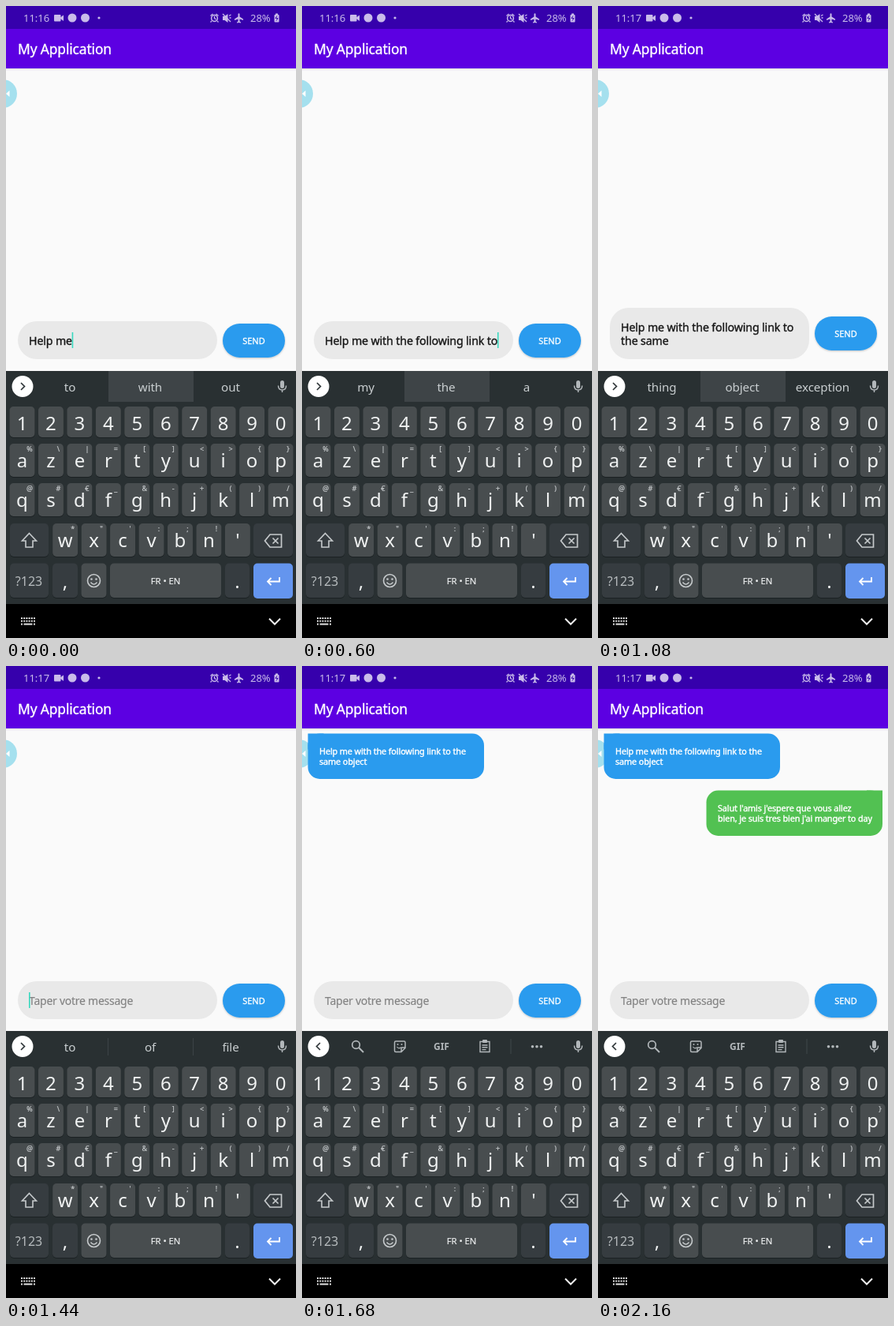
An HTML page for the animation above (2.28 s loop, 368 px wide and 800 px high).

```html
<!DOCTYPE html>
<html lang="en">
<head>
<meta charset="utf-8">
<title>Chat screen</title>
<style>
html, body { margin: 0; width: 100%; height: 100%; overflow: hidden; background: #fafafa; }
svg { display: block; width: 368px; height: 800px; font-family: "Noto Sans", "Open Sans", sans-serif; }
.mid { text-anchor: middle; }
.title { font-size: 17.4px; letter-spacing: -.13px; fill: #fff; stroke: #fff; stroke-width: .35; }
.status { font-size: 13px; fill: #c9bbea; }
.input { font-size: 14.2px; letter-spacing: -.13px; fill: #161616; stroke: #161616; stroke-width: .35; }
.hint { font-size: 14px; letter-spacing: -.25px; fill: #828282; stroke: #828282; stroke-width: .15; }
.bubble { font-size: 10.8px; letter-spacing: -.1px; fill: #fff; stroke: #fff; stroke-width: .4; }
.send { font-size: 11px; fill: #fff; stroke: #fff; stroke-width: .3; }
.word { font-size: 15.2px; letter-spacing: -.1px; fill: #c9ced0; }
.key { font-size: 24px; fill: #f0f2f2; }
.alt { font-size: 9px; fill: #c6cacc; stroke: #c6cacc; stroke-width: .2; }
.mode { font-size: 16px; fill: #b6bbbd; }
.lang { font-size: 11.2px; fill: #eceeef; stroke: #eceeef; stroke-width: .2; }
.gif { font-size: 12px; font-weight: bold; fill: #b2b7ba; }
</style>
</head>
<body>
<svg viewBox="0 0 368 800">
  <defs>
    <linearGradient id="fade" x2="0" y2="1">
      <stop stop-color="#000" stop-opacity=".1"/><stop offset="1" stop-color="#000" stop-opacity="0"/>
    </linearGradient>
    <filter id="soft" x="-20%" y="-20%" width="140%" height="150%">
      <feDropShadow dx="0" dy="1" stdDeviation="1" flood-opacity=".22"/>
    </filter>
  </defs>
  <g id="base"></g>
  <g id="live"></g>
</svg>
<script>
const STEP = 120, LOOP = 2280;
const BLUE = '#2a9bee', ICON = '#b2b7ba', STATUS = '#c9bbea', GLYPH = '#c6cacc';
const base = document.getElementById('base'), live = document.getElementById('live');

const rect = (x, y, w, h, fill, r = 0, more = '') =>
  `<rect x="${x}" y="${y}" width="${w}" height="${h}" rx="${r}" fill="${fill}" ${more}/>`;
const circle = (x, y, r, fill) => `<circle cx="${x}" cy="${y}" r="${r}" fill="${fill}"/>`;
const ring = (x, y, r, color, w = 1.6) =>
  `<circle cx="${x}" cy="${y}" r="${r}" fill="none" stroke="${color}" stroke-width="${w}"/>`;
const text = (x, y, cls, s) =>
  `<text x="${x}" y="${y}" class="${cls}">${s.replace(/&/g, '&amp;').replace(/</g, '&lt;')}</text>`;
const line = (d, color, w = 1.6) =>
  `<path d="${d}" fill="none" stroke="${color}" stroke-width="${w}"/>`;
const shape = (d, fill) => `<path d="${d}" fill="${fill}"/>`;

// Keyboard
const KEY = '#484d4f', DARK = '#363c40';
const column = i => 20.5 + 36.45 * i;
const keycap = (x, y, w, h, fill) => rect(x, y + 1, w, h, '#1b2123', 5) + rect(x, y, w, h, fill, 5);

function keyRow(chars, alts, first, y, h, baseline) {
  return [...chars].map((c, i) => {
    const x = column(first + i);
    return keycap(x - 16, y, 32, h, KEY) + text(x, baseline, 'key mid', c) +
      (alts[i] ? text(x + 9.5, y + 10, 'alt mid', alts[i]) : '');
  }).join('');
}

function keyboard() {
  return rect(0, 462, 368, 295, '#293032') +
    keyRow('1234567890', '', 0, 507, 39, 536.5) +
    keyRow('azertyuiop', '%\\|=[]<>{}', 0, 554, 42, 583.5) +
    keyRow('qsdfghjklm', '@#€_&-+()/', 0, 604, 42, 634) +
    keyRow("wxcvbn'", '*"\':;!', 1.5, 655, 42, 685) +
    keycap(5, 655, 49, 42, DARK) + keycap(314, 655, 50, 42, DARK) +
    line('M29.5 667.5l9 9.5h-4.5v8h-9v-8h-4.5z', GLYPH) +
    line('M335 669h14.5v16h-14.5l-6.5-8zM338.5 673.5l7 7m0-7l-7 7', GLYPH, 1.7) +
    keycap(5, 705.5, 49, 43.5, DARK) + keycap(59, 705.5, 32, 43.5, DARK) +
    keycap(95.5, 705.5, 32, 43.5, KEY) + keycap(132, 705.5, 141, 43.5, KEY) +
    keycap(278, 705.5, 31, 43.5, DARK) + rect(314, 705.5, 50, 44.5, '#6495ee', 5) +
    text(29, 734, 'mode mid', '?123') + text(75, 737, 'key mid', ',') +
    text(293.5, 737, 'key mid', '.') + text(202.5, 732, 'lang mid', 'FR • EN') +
    ring(111.5, 727.5, 8, GLYPH) +
    circle(108.5, 725.5, 1.3, GLYPH) + circle(114.5, 725.5, 1.3, GLYPH) +
    line('M107.5 729.5q4 5 8 0', GLYPH, 1.5) +
    line('M347 723v5.5h-15m4.5-4.5l-4.5 4.5 4.5 4.5', '#fff', 1.8);
}

function navBar() {
  let s = rect(0, 757, 368, 43, '#000');
  for (let i = 0; i < 12; i++) s += rect(19 + i % 6 * 3.2, 774 + (i > 5) * 3.6, 2, 2, '#e4e4e4');
  return s + rect(19, 781.5, 2, 2, '#e4e4e4') + rect(22.5, 781.5, 11, 2, '#e4e4e4') +
    rect(35, 781.5, 2, 2, '#e4e4e4') + line('M334 775.5l7 7 7-7', '#f2f2f2', 2);
}

function topBars() {
  return rect(0, 0, 368, 30, '#3600ac') + rect(0, 29, 368, 50, '#5c00e2') +
    rect(0, 79, 368, 3, 'url(#fade)') + text(15, 61, 'title', 'My Application') +
    rect(61, 11, 8.5, 8.5, STATUS, 1) + shape('M69 14.5l4-3v7.5l-4-3z', STATUS) +
    circle(84, 15, 5.5, STATUS) + circle(100.5, 15, 5.5, STATUS) + circle(118, 15, 1.6, STATUS) +
    ring(264.5, 15.5, 3.9, STATUS, 1.5) +
    line('M259.5 12.5l3-2.5m4 0l3 2.5M264.5 13v2.5l2 1.5M261 19l-1.5 1.5m8.5-1.5l1.5 1.5', STATUS, 1.3) +
    shape('M275 13h2.5l4-3v11l-4-3h-2.5z', STATUS) +
    line('M275 10l10 10M283 12.5l2.5-1.5M283.5 15h2', STATUS, 1.3) +
    shape('M294.5 10q1-1.5 2 0v3.5l4.5 3v1.5l-4.5-1.5v3l1.5 1v1l-2.5-.6-2.5.6v-1l1.5-1v-3l-4.5 1.5v-1.5l4.5-3z', STATUS) +
    text(310, 19.7, 'status', '28%') +
    rect(342, 9.5, 3, 2, STATUS) + rect(340.5, 11, 6, 9.5, STATUS, 1) +
    line('M344 12.5l-2 3h3l-2 3', '#3600ac', 1);
}

base.innerHTML = topBars() + circle(-4, 111, 18, '#a5e0ee') + shape('M0 111l4.5-4v8z', '#fff') +
  keyboard() + navBar();

// Suggestion strip
function arrowButton(open) {
  const d = open ? 'M23 477l-4.5 4.5 4.5 4.5' : 'M19 477l4.5 4.5-4.5 4.5';
  return circle(21, 481.5, 13.5, '#fff') + line(d, '#30373a', 1.7);
}
const mic = rect(348, 474, 5, 10, ICON, 2.5) +
  line('M345.5 480.5q0 5.5 5 5.5t5-5.5M350.5 486v3', ICON, 1.5);

function suggestions(words, pressed) {
  const strip = pressed ? rect(130, 462, 108, 39, '#3e4447')
    : rect(129, 471, 1, 22, '#3c4346') + rect(237, 471, 1, 22, '#3c4346');
  return strip + words.split(' ').map((w, i) => text(81 + 102 * i, 487.7, 'word mid', w)).join('');
}

function toolbar() {
  return ring(68.5, 479.5, 4.8, ICON, 1.7) + line('M72 483l6 6', ICON, 2) +
    line('M119 475h10.5q1.5 0 1.5 1.5v7l-5 5h-7q-1.5 0-1.5-1.5v-10.5q0-1.5 1.5-1.5zM131 483h-5v5', ICON, 1.5) +
    circle(121.5, 479, 1, ICON) + circle(126.5, 479, 1, ICON) + line('M120.5 482q2 3 4.5 1', ICON, 1.2) +
    text(177, 486, 'gif mid', 'GIF') +
    line('M226 475.5h12v13h-12zM228.5 480h7m-7 2.8h7m-7 2.8h5', ICON, 1.4) +
    rect(229, 473, 6, 4, ICON, 1) + rect(264.5, 472, 1, 19, '#41484b') +
    [292.5, 298, 303.5].map(x => circle(x, 481.8, 1.8, ICON)).join('');
}

// Conversation: a bubble is rounded everywhere except at its sender's corner
function bubble(x, y, color, mine, lines) {
  const w = 223.5, h = 57.5;
  return rect(x, y, w, h, color, 15) + rect(mine ? x : x + w - 20, y, 20, 20, color) +
    lines.map((s, i) => text(x + 14.5, y + 26.5 + 13.4 * i, 'bubble', s)).join('');
}
const sent = () => bubble(7.5, 85.5, BLUE, true,
  ['Help me with the following link to the', 'same object']);
const reply = () => bubble(137.5, 157.5, '#52c152', false,
  ["Salut l'amis j'espere que vous allez", "bien, je suis tres bien j'ai manger to day"]);

function composer(first, second) {
  const top = second ? 382 : 399, button = second ? 393 : 402;
  return rect(15, top, 253, 447 - top, '#e9e9e9', 24) +
    rect(275, button, 79, 43, BLUE, 21.5, 'filter="url(#soft)"') +
    text(314.5, button + 25.5, 'send mid', 'SEND') +
    (first ? text(29, second ? 412 : 429, 'input', first) : text(29, 429, 'hint', 'Taper votre message')) +
    (second ? text(29, 429, 'input', second) : '');
}

// Each entry: typed words, suggestions, middle word pressed, caret shown
const FULL = 'Help me with the following link to';
const typing = [
  [2, 'to with out', 1, 1],
  [3, 'my the a', 1, 1],
  [4, 'same following first', 1, 1],
  [5, 'code link steps', 1, 1],
  [6, 'and to in', 1, 1],
  [7, 'my the a', 1, 1],
  ['the', 'reference same destination', 0, 1],
  ['the', 'reference same destination', 1, 1],
  ['the same', 'thing object exception', 0, 1],
  ['the same', 'thing object exception', 1, 0],
  ['the same object', 'to of file', 0, 1],
  ['the same object', 'to of file', 0, 1],
  [0, 'to of file', 0, 1]
];

function draw(n) {
  const state = typing[n];
  const s = text(22, 19.7, 'status', n < 8 ? '11:16' : '11:17') + mic + arrowButton(!state);
  if (!state) {
    live.innerHTML = s + toolbar() + composer() + sent() + (n >= 16 ? reply() : '');
    return;
  }
  const [typed, words, pressed, caret] = state;
  const second = typeof typed === 'string' ? typed : '';
  const first = second ? FULL : FULL.split(' ').slice(0, typed).join(' ');
  live.innerHTML = suggestions(words, pressed) + s + composer(first, second);
  if (!caret) return;
  const last = [...live.querySelectorAll('.input')].pop();
  const x = last ? 28.7 + last.getComputedTextLength() : 29;
  live.innerHTML += rect(x, second ? 417 : 413, 1.6, second ? 16 : 20, '#38d9bf');
}

let shown = -1;
function tick() {
  const n = Math.floor(performance.now() % LOOP / STEP);
  if (n !== shown) draw(shown = n);
  requestAnimationFrame(tick);
}
tick();
</script>
</body>
</html>
```
